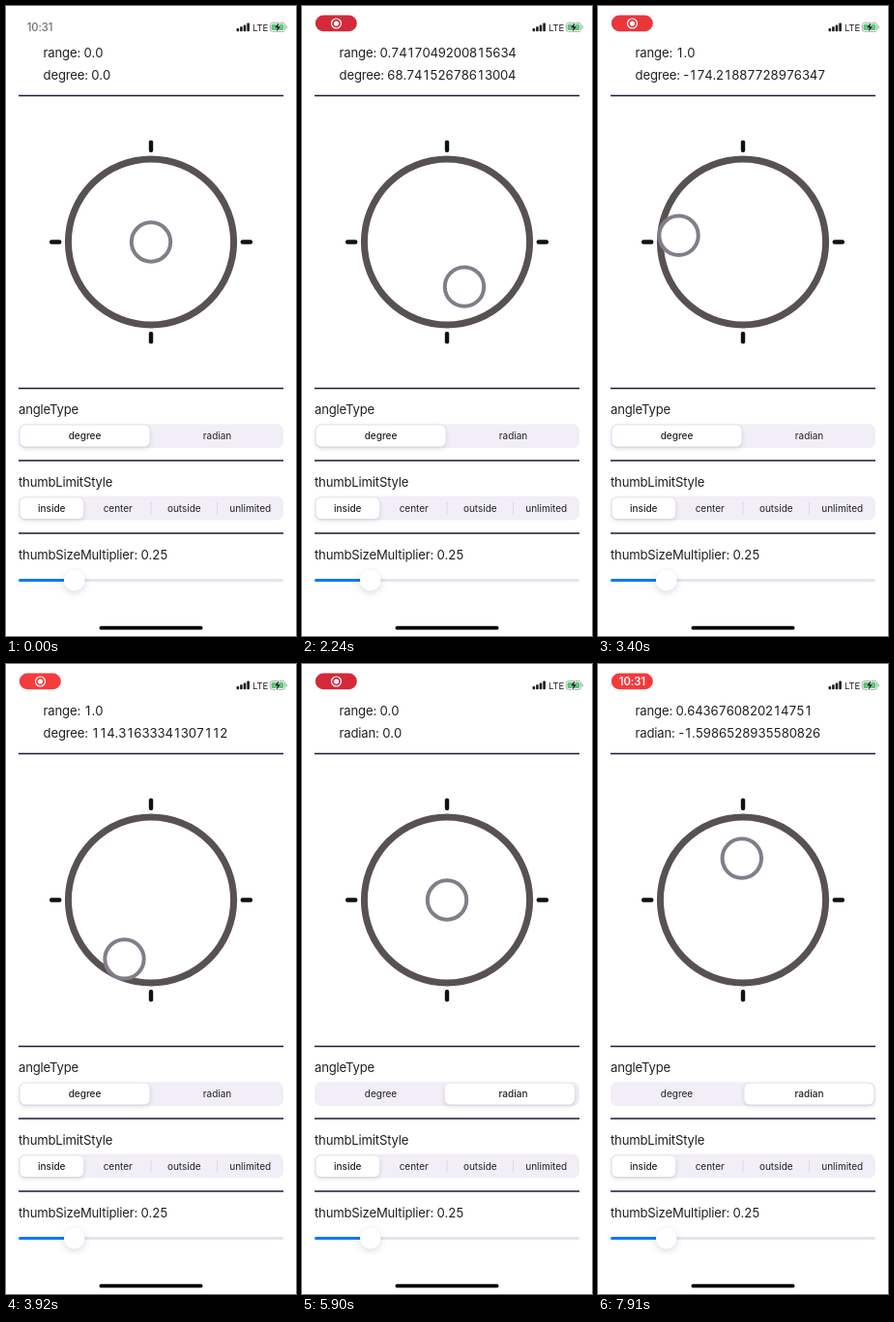
Write an HTML page with a canvas that moves like this. It is 300 by 650 pixels and loops after 8000 ms.

```html
<!DOCTYPE html>
<html lang="en">
<head>
<meta charset="utf-8">
<title>Joystick demo</title>
<style>
  html, body { margin: 0; width: 100%; height: 100%; overflow: hidden; background: #fff; }
  canvas { display: block; width: 300px; height: 650px; }
</style>
</head>
<body>
<canvas id="stage"></canvas>
<script>
const W = 300, H = 650, LOOP = 8000;
const CENTER = { x: 150, y: 243.5 };
const REACH = 66.8;
const FONT = 'Inter, "Open Sans", sans-serif';
const INK = '#202022', TRAY = '#f1eef7';

const canvas = document.getElementById('stage');
const ctx = canvas.getContext('2d');
const dpr = window.devicePixelRatio || 1;
canvas.width = W * dpr;
canvas.height = H * dpr;

// Drag paths: [time, angle, range]; the first in degrees, the second in radians.
const DEGREE_DRAG = [
  [1450, 28, 0],
  [1700, 40, 0.12],
  [2240, 68.74152678613004, 0.7417049200815634],
  [2260, 68.74152678613004, 0.7417049200815634],
  [2420, 45, 1],
  [3400, -174.21887728976347, 1],
  [3500, -174.21887728976347, 1],
  [3535, -180, 1],
  [3535, 180, 1],
  [4400, 32.807327467115336, 1],
  [4500, 32.807327467115336, 1],
  [5040, -58, 1]
];
const RADIAN_DRAG = [
  [7020, -1.42, 0],
  [7300, -1.5, 0.14],
  [7910, -1.5986528935580826, 0.6436760820214751],
  [8000, -1.5986528935580826, 0.6436760820214751]
];
const SWITCH_AT = 5600, SWITCH_TIME = 430;

const clamp = v => Math.max(0, Math.min(1, v));
const progress = (t, start, length) => clamp((t - start) / length);
const lerp = (a, b, p) => a + (b - a) * p;

function sample(keys, t) {
  if (t < keys[0][0] || t > keys[keys.length - 1][0]) return { angle: 0, range: 0 };
  let i = 0;
  while (i < keys.length - 2 && t >= keys[i + 1][0]) i++;
  const [t0, a0, r0] = keys[i], [t1, a1, r1] = keys[i + 1];
  const p = progress(t, t0, t1 - t0);
  return { angle: lerp(a0, a1, p), range: lerp(r0, r1, p) };
}

const decimal = n => Number.isInteger(n) ? n.toFixed(1) : String(n);

function setType(size, weight, color, align, gap) {
  ctx.font = `${weight} ${size}px ${FONT}`;
  ctx.letterSpacing = gap + 'px';
  ctx.textAlign = align;
  ctx.fillStyle = color;
}

function text(str, x, y, { size = 10, weight = 400, color = INK, align = 'left', gap = 0 } = {}) {
  setType(size, weight, color, align, gap);
  ctx.fillText(str, x, y);
}

// Body text with tabular figures.
function label(str, x, y) {
  setType(13.08, 400, INK, 'left', -0.17);
  const cell = ctx.measureText('0').width;
  for (const run of str.match(/\d|\D+/g)) {
    const width = ctx.measureText(run).width;
    const advance = /\d/.test(run) ? cell : width;
    ctx.fillText(run, x + (advance - width) / 2, y);
    x += advance;
  }
}

function box(x, y, w, h, r, color) {
  ctx.fillStyle = color;
  ctx.beginPath();
  ctx.roundRect(x, y, w, h, r);
  ctx.fill();
}

function disc(x, y, r, color) {
  ctx.fillStyle = color;
  ctx.beginPath();
  ctx.arc(x, y, r, 0, Math.PI * 2);
  ctx.fill();
}

function ring(x, y, r, width, color) {
  ctx.strokeStyle = color;
  ctx.lineWidth = width;
  ctx.beginPath();
  ctx.arc(x, y, r, 0, Math.PI * 2);
  ctx.stroke();
}

function withAlpha(alpha, draw) {
  if (alpha <= 0) return;
  ctx.save();
  ctx.globalAlpha = alpha;
  draw();
  ctx.restore();
}

function withShadow(alpha, blur, dy, draw) {
  ctx.save();
  ctx.shadowColor = `rgba(40, 30, 70, ${alpha})`;
  ctx.shadowBlur = blur * dpr;
  ctx.shadowOffsetY = dy * dpr;
  draw();
  ctx.restore();
}

function drawClock(t) {
  const clock = { size: 11.2, weight: 500, align: 'center', gap: -0.1 };
  withAlpha(1 - progress(t, 20, 230), () => text('10:31', 35, 26, { ...clock, color: '#707074' }));
  withAlpha(progress(t, 60, 300), () => {
    const glow = 0.5 + 0.5 * Math.cos((t - 4100) / 3600 * Math.PI * 2);
    const red = `rgb(${lerp(210, 248, glow)}, ${lerp(42, 58, glow)}, ${lerp(58, 60, glow)})`;
    box(13.8, 9.6, 43, 16.6, 8.3, red);
  });
  const toTime = progress(t, 6900, 250);
  withAlpha(progress(t, 200, 250) * (1 - toTime), () => {
    ring(35.5, 18, 5, 1.2, '#fff');
    disc(35.5, 18, 2.6, '#fff');
  });
  withAlpha(toTime, () => text('10:31', 35.3, 22, { ...clock, weight: 600, color: '#fff' }));
}

function drawStatus() {
  [3.2, 4.9, 6.7, 8.6].forEach((h, i) => box(238.5 + i * 3.6, 26.2 - h, 2.6, h, 0.7, INK));
  text('LTE', 255, 25.7, { size: 9.6, gap: -0.15 });

  ctx.strokeStyle = '#a3a6a4';
  ctx.lineWidth = 0.9;
  ctx.beginPath();
  ctx.roundRect(273.2, 17.4, 15.4, 9, 2.6);
  ctx.stroke();
  box(289.6, 20.3, 1.1, 3.2, 0.5, '#a3a6a4');
  box(274.5, 18.7, 12.8, 6.4, 1.6, '#4fca70');

  ctx.fillStyle = INK;
  ctx.strokeStyle = '#fff';
  ctx.beginPath();
  ctx.moveTo(282.3, 17.2);
  ctx.lineTo(277.6, 22.5);
  ctx.lineTo(280.6, 22.5);
  ctx.lineTo(279.6, 26.7);
  ctx.lineTo(284.4, 21.2);
  ctx.lineTo(281.4, 21.2);
  ctx.closePath();
  ctx.stroke();
  ctx.fill();
}

function drawJoystick({ angle, range }) {
  const { x, y } = CENTER;
  ring(x, y, 85.6, 7, '#575251');
  for (const side of [-1, 1]) {
    box(x - 2.2, y + side * 98.8 - 6.2, 4.4, 12.4, 2, '#111');
    box(x + side * 98.8 - 6.2, y - 2.2, 12.4, 4.4, 2, '#111');
  }
  const thumbX = x + range * REACH * Math.cos(angle);
  const thumbY = y + range * REACH * Math.sin(angle);
  disc(thumbX, thumbY, 20.2, '#fff');
  ring(thumbX, thumbY, 20.2, 4, '#807e89');
}

// "slot" is the fractional index of the white pill.
function drawSegments(y, labels, slot) {
  const left = 13, width = 274 / labels.length;
  const chosen = Math.round(slot);
  box(left, y, 274, 24.8, 6.8, TRAY);
  for (let i = 1; i < labels.length; i++) {
    if (i === chosen || i === chosen + 1 || labels.length === 2) continue;
    box(left + i * width - 0.4, y + 6, 0.8, 13, 0.4, '#d8d4e0');
  }
  const pillWidth = width - 3;
  const pillX = lerp(left + 1.5, left + 274 - 1.5 - pillWidth, slot / (labels.length - 1));
  withShadow(0.16, 5, 1.8, () => box(pillX, y + 1.6, pillWidth, 21.6, 5.4, '#fff'));
  labels.forEach((name, i) => text(name, left + (i + 0.5) * width, y + 16.1, {
    align: 'center', weight: i === chosen ? 500 : 400
  }));
}

function drawSlider() {
  box(13, 591.1, 274, 3, 1.5, '#e5e3ee');
  box(13, 591.1, 58, 3, 1.5, '#0c79fb');
  withShadow(0.17, 7, 2.4, () => disc(70.7, 592.6, 10.7, '#fff'));
}

function draw(t) {
  ctx.setTransform(dpr, 0, 0, dpr, 0, 0);
  ctx.fillStyle = '#fff';
  ctx.fillRect(0, 0, W, H);

  const radians = t >= SWITCH_AT;
  const stick = sample(radians ? RADIAN_DRAG : DEGREE_DRAG, t);
  const shown = stick.range === 0 ? 0 : stick.angle;

  drawClock(t);
  drawStatus();
  label('range: ' + decimal(stick.range), 38.6, 53);
  label((radians ? 'radian: ' : 'degree: ') + decimal(shown), 38.6, 75.8);

  for (const middle of [92.6, 394.4, 469, 544]) box(13, middle - 0.75, 274, 1.5, 0, '#20163a');

  drawJoystick({ angle: radians ? stick.angle : stick.angle * Math.PI / 180, range: stick.range });

  label('angleType', 13, 421);
  const slide = 1 - (1 - progress(t, SWITCH_AT, SWITCH_TIME)) ** 3;
  drawSegments(431.2, ['degree', 'radian'], slide);
  label('thumbLimitStyle', 13, 496);
  drawSegments(505.8, ['inside', 'center', 'outside', 'unlimited'], 0);
  label('thumbSizeMultiplier: 0.25', 13, 570.6);
  drawSlider();
  box(96.5, 639.8, 107, 3.8, 1.9, '#000');
}

const start = performance.now();
function tick() {
  draw((performance.now() - start) % LOOP);
  requestAnimationFrame(tick);
}
tick();
</script>
</body>
</html>
```
